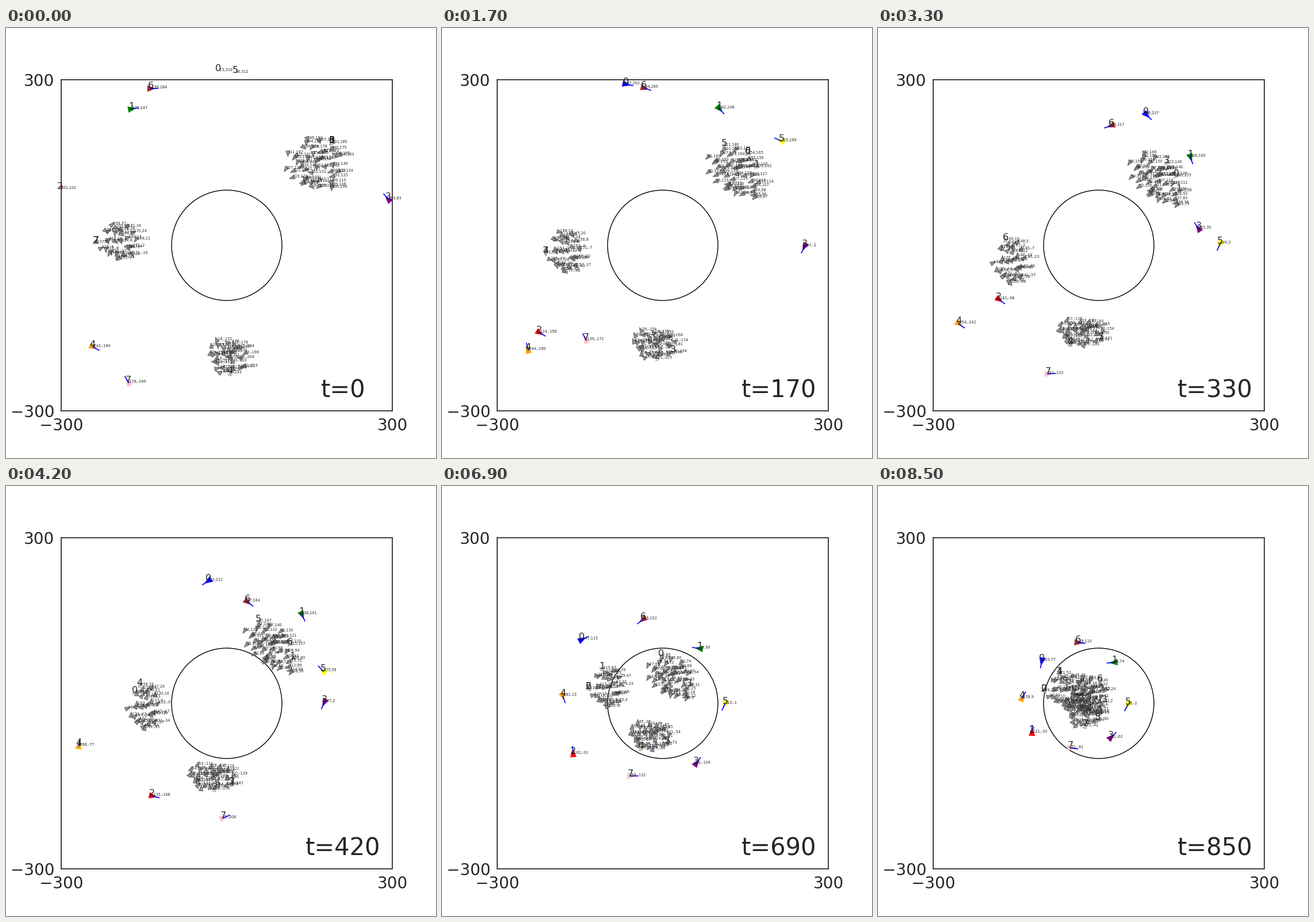
Animation of 748x748 px, one loop 8600 ms. Source, as a matplotlib script:

```python
import numpy as np
import matplotlib.pyplot as plt
from matplotlib.animation import FuncAnimation
from matplotlib.collections import PolyCollection
from matplotlib.patches import Circle

SIZE, DPI, FRAMES, STEP = 748, 100, 86, 100
INK = "0.15"
TIME = np.arange(FRAMES)
plt.rcParams["font.family"] = "DejaVu Sans"
rng = np.random.default_rng(4)

# Each dog: colour, the side it sweeps to and its waypoints at the turning times.
TURNS = np.array([0, 17, 33, 42, 57, 85])
DOGS = [
    ("blue", "---+-+", [-15, 316, -67, 292, 86, 237, -33, 222, -179, 145, -103, 77]),
    ("green", "----++", [-173, 247, 102, 248, 166, 160, 136, 161, 104, 108, 28, 74]),
    ("red", "++++--", [-302, 102, -224, -158, -181, -98, -135, -168, -189, -126, -121, -53]),
    ("purple", "+-+-++", [293, 83, 257, -2, 181, 30, 177, 2, 100, -136, 22, -62]),
    ("orange", "+-+-+-", [-243, -184, -244, -190, -254, -142, -268, -77, -213, 17, -139, 9]),
    ("yellow", "-+-+--", [16, 312, 215, 189, 220, 3, 175, 58, 158, 3, 53, -2]),
    ("brown", "--+-+-", [-138, 284, -34, 285, 23, 217, 37, 184, -28, 184, -38, 110]),
    ("pink", "--++++", [-178, -249, -139, -172, -92, -233, -7, -208, -55, -172, -51, -81]),
]
COLORS = [dog[0] for dog in DOGS]

# Each flock: head count, first and last radius, path of its centre.
DRIVE = [0, 33, 57, 85]
FLOCKS = [
    (44, 52, 38, [160, 144, 105, 117, 40, 70, -20, 10]),
    (28, 36, 34, [-198, 5, -162, -31, -132, 30, -62, 22]),
    (31, 35, 32, [-2, -202, -37, -158, -24, -93, -32, -14]),
]


def unit(angle):
    return np.stack([np.cos(angle), np.sin(angle)], axis=-1)


def patrol(sides, points):
    """Orbit around the middle; the heading leans inward on the chosen side."""
    x, y = np.reshape(points, (-1, 2)).T
    bearing = np.interp(TIME, TURNS, np.unwrap(np.arctan2(y, x)))
    radius = np.interp(TIME, TURNS, np.hypot(x, y))
    nearest = np.abs(TIME[:, None] - TURNS).argmin(axis=1)
    side = np.array([1 if c == "+" else -1 for c in sides])[nearest]
    pos = radius[:, None] * unit(bearing)
    aim = bearing + side * np.radians(115)
    lure = unit(bearing + side * np.radians(52))
    return pos, aim, lure


def herd(n, first, last, points):
    """Scattered disc that follows its centre and spreads sideways while driven."""
    x, y = np.reshape(points, (-1, 2)).T
    center = np.stack([np.interp(TIME, DRIVE, x), np.interp(TIME, DRIVE, y)], axis=-1)
    i = np.arange(n)
    spots = np.sqrt((i + 0.5) / n)[:, None] * unit(2.39996 * i) + rng.normal(0, 0.1, (n, 2))
    out = unit(np.arctan2(y[0], x[0]))
    across = np.array([-out[1], out[0]])
    radius = np.interp(TIME, [0, FRAMES - 1], [first, last])[:, None, None]
    wide = 1 + 0.3 * np.sin(np.pi * TIME / (FRAMES - 1))[:, None, None]
    shape = (spots @ out)[:, None] * out / wide + (spots @ across)[:, None] * across * wide
    step = np.diff(center, axis=0, append=2 * center[-1:] - center[-2:-1])
    calm = np.interp(TIME, [0, 12], [0.9, 0.3])[:, None]
    head = np.arctan2(step[:, 1], step[:, 0])[:, None] + calm * rng.normal(0, 1, n)
    return center[:, None] + radius * shape, head


def arrows(pos, angle, length, width):
    """Triangles centred on pos that point along angle."""
    ahead = unit(angle)
    beside = np.stack([-ahead[:, 1], ahead[:, 0]], axis=-1) * width / 2
    back = pos - 0.4 * length * ahead
    return np.stack([pos + 0.6 * length * ahead, back + beside, back - beside], axis=1)


dog_pos, dog_dir, lure = (np.stack(p, axis=1) for p in zip(*(patrol(*d[1:]) for d in DOGS)))
sheep_pos, sheep_dir = (np.concatenate(p, axis=1) for p in zip(*(herd(*f) for f in FLOCKS)))

fig = plt.figure(figsize=(SIZE / DPI, SIZE / DPI), dpi=DPI, facecolor="white")
ax = fig.add_axes([96 / SIZE, 82 / SIZE, 576 / SIZE, 576 / SIZE])
ax.set(xlim=(-300, 300), ylim=(-300, 300), xticks=[-300, 300], yticks=[-300, 300])
ax.tick_params(length=0, pad=8.4, labelsize=20, labelcolor=INK)
for spine in ax.spines.values():
    spine.set(color=INK, linewidth=1.25)
ax.add_patch(Circle((0, 0), 100, fill=False, edgecolor="black", linewidth=1))


def triangles(fill, edge, width, alpha, z):
    return ax.add_collection(PolyCollection([], facecolors=fill, edgecolors=edge,
                                            linewidths=width, alpha=alpha, zorder=z))


def labels(n, size, **kw):
    return [ax.text(0, 0, "", fontsize=size, color=INK, va="baseline", zorder=3, **kw)
            for _ in range(n)]


flock = triangles("gray", "0.25", 0.6, 0.85, 2)
marked = triangles("tan", "0.45", 0.4, 0.8, 2.2)
pack = triangles(COLORS, COLORS, 0.5, None, 2.4)
aims = [ax.plot([], [], color="blue", lw=1.2, zorder=2.5)[0] for _ in DOGS]
coords = labels(len(DOGS) + sheep_pos.shape[1], 4.7)
numbers = labels(2 * len(DOGS), 11.6, ha="center")
for k, num in enumerate(numbers):
    num.set_text(str(k % len(DOGS)))
clock = ax.text(211, -276, "", fontsize=30, color=INK, ha="center", va="baseline")


def draw(t):
    # Every dog goes for the sheep that sticks out most on its side.
    chased = (lure[t] @ sheep_pos[t].T).argmax(axis=1)
    goal = sheep_pos[t][chased]
    rest = np.setdiff1d(np.arange(sheep_pos.shape[1]), chased)
    flock.set_verts(arrows(sheep_pos[t][rest], sheep_dir[t][rest], 10, 7.5))
    marked.set_verts(arrows(goal, sheep_dir[t][chased], 9, 7))
    pack.set_verts(arrows(dog_pos[t], dog_dir[t], 14, 10.5))
    for aim, start, end in zip(aims, dog_pos[t], dog_pos[t] + 13 * unit(dog_dir[t])):
        aim.set_data(*zip(start, end))
    for text, (x, y) in zip(coords, np.concatenate([dog_pos[t], sheep_pos[t]])):
        text.set_position((x, y))
        text.set_text(f"{x:.0f},{y:.0f}")
    for num, spot in zip(numbers, np.concatenate([dog_pos[t], goal])):
        num.set_position(spot)
    clock.set_text(f"t={t * 10}")
    return []


anim = FuncAnimation(fig, draw, frames=FRAMES, interval=STEP, repeat=True, repeat_delay=0)
plt.show()
```
